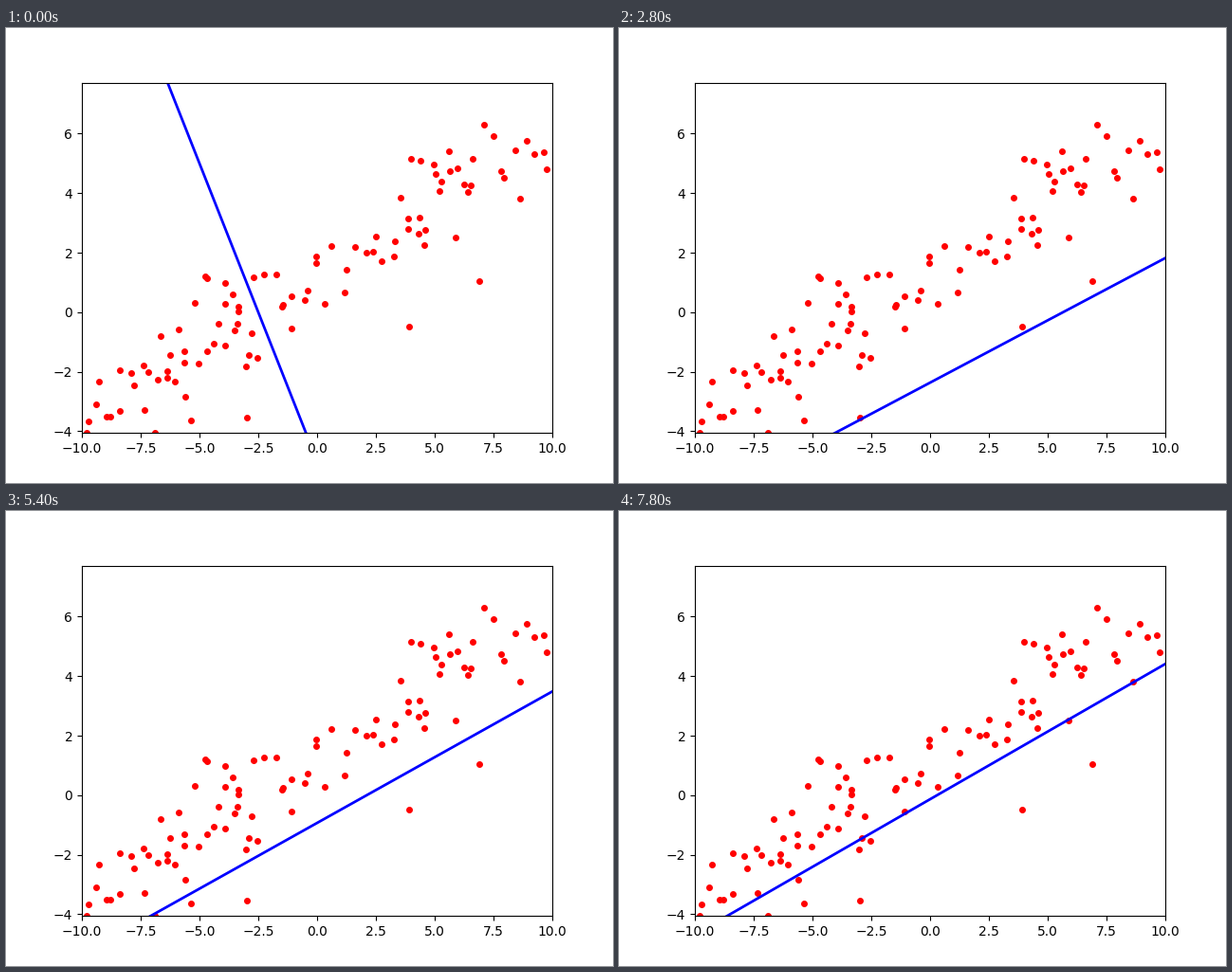
Animation, 640 px wide and 480 px high, one loop 8000 ms. Source, as a matplotlib script:

```python
import numpy as np
import matplotlib.pyplot as plt
from matplotlib.animation import FuncAnimation

STEPS, INTERVAL = 40, 200
RATE = 0.02
X_LIM, Y_LIM = (-10, 10), (-4.055, 7.715)
COUNT, SPREAD = 100, 1.1
SLOPE, OFFSET = 0.475, 1.14
# Evenly ranked x values that set how densely the samples lie.
QUANTILES = [-9.96, -7.31, -5.66, -3.93, -2.64, 0.06, 3.45, 4.86, 6.72, 9.74]


def make_samples(seed=4):
    """Noisy samples whose least-squares line is exactly SLOPE * x + OFFSET."""
    rng = np.random.default_rng(seed)
    ranks = np.linspace(0, len(QUANTILES) - 1, COUNT)
    x = np.interp(ranks, range(len(QUANTILES)), QUANTILES)
    x += rng.uniform(-0.2, 0.2, COUNT)
    noise = rng.normal(0, 1, COUNT)
    noise -= np.polyval(np.polyfit(x, noise, 1), x)
    return x, SLOPE * x + OFFSET + SPREAD * noise / noise.std()


def descend(x, y, w=-2.0, b=-5.0):
    """Slope and intercept after every gradient step on the mean squared error."""
    path = []
    for _ in range(STEPS):
        path.append((w, b))
        err = w * x + b - y
        w -= RATE * 2 * np.mean(err * x)
        b -= RATE * 2 * np.mean(err)
    return path


xs, ys = make_samples()
fits = descend(xs, ys)

fig, ax = plt.subplots(figsize=(6.4, 4.8), dpi=100)
ax.set(xlim=X_LIM, ylim=Y_LIM)
ax.plot(xs, np.clip(ys, *Y_LIM), "ro", markersize=4)
ends = np.array(X_LIM)
line, = ax.plot([], [], "b", linewidth=2)


def update(step):
    w, b = fits[step]
    line.set_data(ends, w * ends + b)
    return line,


anim = FuncAnimation(fig, update, frames=STEPS, interval=INTERVAL,
                     repeat=True, repeat_delay=0)
plt.show()
```
